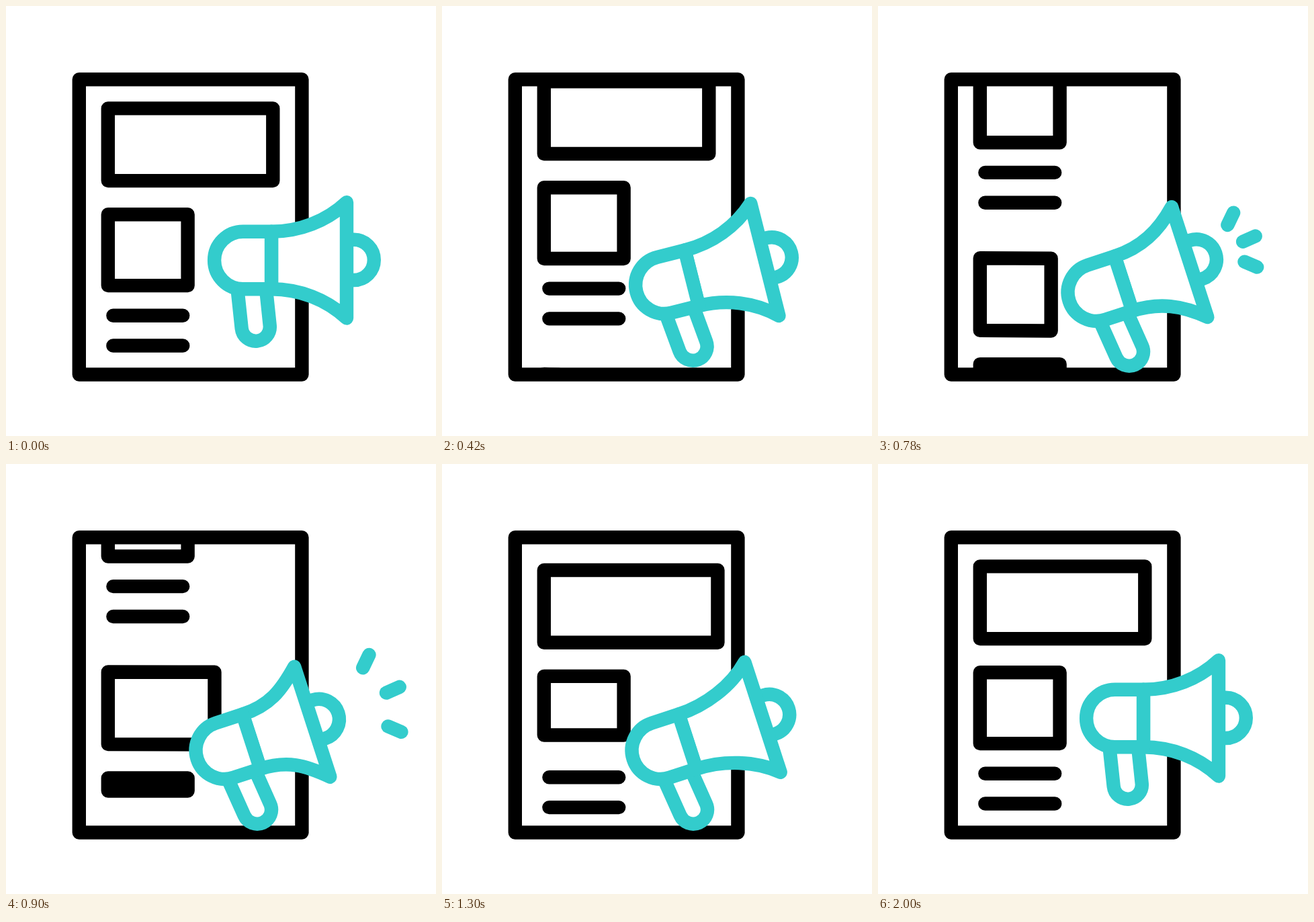
Write an HTML page that moves like this. It is 640x640 px and loops after 2.42 s.

```html
<!DOCTYPE html>
<html lang="en">
<head>
<meta charset="utf-8">
<title>News announcement</title>
<style>
  html, body { margin: 0; width: 100%; height: 100%; overflow: hidden; background: #fff; }
  svg { display: block; width: 100%; height: 100%; fill: none; stroke-width: 20.4; stroke-linecap: round; stroke-linejoin: round; }
</style>
</head>
<body>
<svg viewBox="0 0 640 640">
  <clipPath id="page"><rect x="109" y="109" width="331" height="440"/></clipPath>
  <g stroke="#000">
    <g clip-path="url(#page)"><path id="articles"/></g>
    <rect x="108.8" y="109.3" width="331.6" height="439.2"/>
  </g>
  <g stroke="#33cccc">
    <g id="megaphone" fill="#fff">
      <path d="M344.4 421L350.7 479.8A21.1 21.1 0 0 0 392.7 475.3L387 421"/>
      <path id="bell"/>
      <path id="horn"/>
      <path d="M395 335.8H352.8a42.7 42.7 0 0 0 0 85.4H395z"/>
    </g>
    <path id="sound"/>
  </g>
</svg>
<script>
const LOOP = 2420, SPACING = 435.6;
const $ = id => document.getElementById(id);

// Eased value at time t through [time, value] keys
function track(t, ...keys) {
  let [t0, v0] = keys[0];
  for (const [t1, v1] of keys) {
    if (t < t1) {
      const u = Math.max(0, (t - t0) / (t1 - t0));
      return v0 + (v1 - v0) * u * u * (3 - 2 * u);
    }
    [t0, v0] = [t1, v1];
  }
  return v0;
}

// Headline box, picture box and two text lines, shifted down by y
function article(y, width, height, skew) {
  return `M151.8 ${152.4 + y}l${width} ${skew}v107.7l${-width} ${-skew}z` +
    `M151.8 ${310.3 + y}h118.8v${height}h-118.8z` +
    `M159.4 ${460.7 + y}h103.8M159.4 ${505.5 + y}h103.8`;
}

// Rays: start point and direction in degrees
const rays = [[517.5, 332, -64.5], [537, 353.5, -24], [539.3, 378, 23]];

function ray([x, y, deg], from, to) {
  const a = deg * Math.PI / 180;
  const at = d => `${x + d * Math.cos(a)} ${y + d * Math.sin(a)}`;
  return `M${at(from)}L${at(to)}`;
}

function draw(t) {
  const scroll = track(t, [200, 0], [1380, SPACING]);
  const width = track(t, [460, 22], [1260, 259], [1670, 245.5]);
  const height = track(t, [650, 0], [1640, 120.2], [2000, 105.8]);
  const skew = Math.max(0, 1 - width / 245.5);
  $('articles').setAttribute('d',
    article(-scroll, 245.5, 105.8, 0) + article(SPACING - scroll, width, height, skew));

  const tilt = track(t, [0, 0], [600, 1], [1400, 1], [2000, 0]);
  $('megaphone').setAttribute('transform',
    `translate(${2.3 * tilt} ${37 * tilt}) rotate(${-18 * tilt} 371.7 478)`);

  const push = track(t, [600, 0], [1000, -20], [1200, 11], [1400, 0]);
  const tip = 507 + push;
  $('horn').setAttribute('d',
    `M395 335.8C437 335.8 ${tip - 30} 320.3 ${tip} 292.2V464.6C${tip - 30} 436.7 437 421.2 395 421.2z`);
  $('bell').setAttribute('d', `M${tip} 347.8h10.7a30.1 30.1 0 0 1 0 60.2h-10.7`);

  const from = track(t, [700, 0], [1100, 63]);
  const to = track(t, [600, 0], [1000, 63]);
  $('sound').setAttribute('d', to > from ? rays.map(r => ray(r, from, to)).join('') : '');
}

const start = performance.now();
function tick() {
  draw((performance.now() - start) % LOOP);
  requestAnimationFrame(tick);
}
tick();
</script>
</body>
</html>
```
